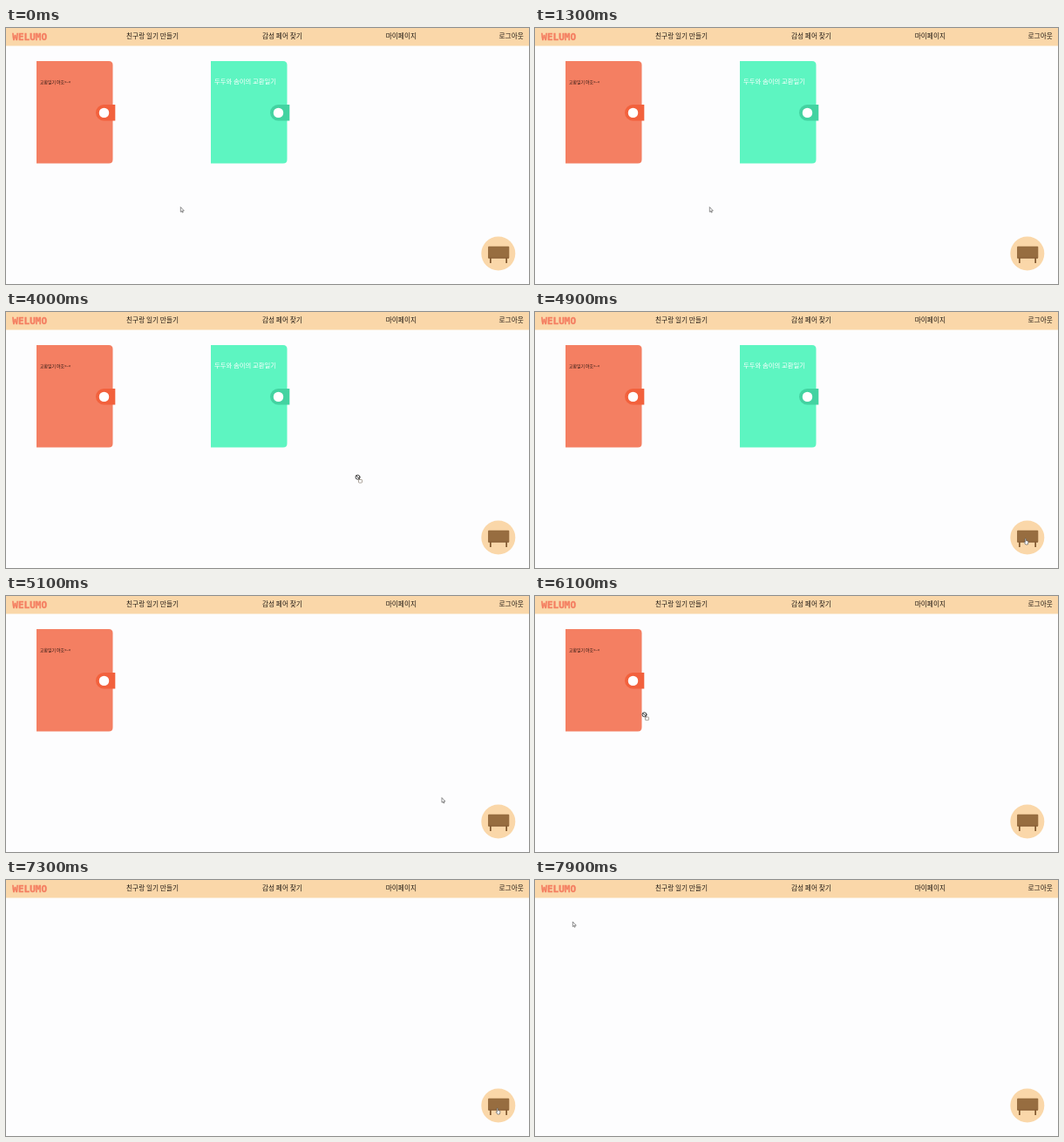
Animation of 600 by 294 pixels, one loop 8 s. Source, as an HTML page:

```html
<!DOCTYPE html>
<html>
<head>
<meta charset="utf-8">
<title>Exchange diaries</title>
<style>
  html, body { margin: 0; width: 100%; height: 100%; overflow: hidden; background: #fdfdfe; }
  svg { display: block; width: 600px; height: 294px; font-family: "Noto Sans CJK KR", "Noto Sans CJK JP", "Noto Sans CJK", sans-serif; }
  .nav { font-size: 7.7px; font-weight: 500; fill: #201a14; }
  .brand { font: 700 11px "DejaVu Sans Mono", monospace; fill: #f47f62; stroke: #f47f62; stroke-width: .4px; }
  .red { --cover: #f47f62; --clasp: #f2613d; }
  .green { --cover: #5df5c1; --clasp: #43d3a1; }
  .cover { fill: var(--cover); }
  .clasp { fill: var(--clasp); }
  .cursor { stroke-linejoin: round; stroke-linecap: round; }
</style>
</head>
<body>
<svg viewBox="0 0 600 294">
  <defs>
    <g id="book">
      <path class="cover" d="M0 0H83Q87.5 0 87.5 4.5V113Q87.5 117.5 83 117.5H0Z"/>
      <path class="clasp" d="M90.3 50V68.5H77.3A9.25 9.25 0 0 1 77.3 50Z"/>
      <circle cx="77.5" cy="59.4" r="5.7" fill="#fff"/>
    </g>
  </defs>

  <rect width="600" height="294" fill="#fdfdfe"/>
  <rect width="600" height="20.5" fill="#fad7a9"/>
  <text class="brand" x="7.3" y="13.8">WELUMO</text>
  <g class="nav">
    <text x="138" y="12">친구랑 일기 만들기</text>
    <text x="294" y="12">감성 페어 찾기</text>
    <text x="435.7" y="12">마이페이지</text>
    <text x="565.5" y="12">로그아웃</text>
  </g>

  <g id="red" class="red" transform="translate(35 38)">
    <use href="#book"/>
    <text x="4" y="25.8" font-size="4.9" font-weight="500" fill="#2a1712">교환일기 야호&gt;-&lt;</text>
  </g>
  <g id="green" class="green" transform="translate(235 38)">
    <use href="#book"/>
    <text x="4" y="26" font-size="7.36" fill="#fff">두두와 솜이의 교환일기</text>
  </g>

  <g>
    <circle cx="564.8" cy="259" r="19.5" fill="#fad7a9"/>
    <path d="M555 263h1.7v7H555zM573.3 263h1.7v7h-1.7z" fill="#80582f"/>
    <rect x="553" y="250.7" width="24.3" height="13.8" rx="1" fill="#976d40"/>
    <path d="M553.3 264H577" stroke="#80582f" stroke-width=".9"/>
  </g>

  <g id="cursor" class="cursor">
    <path id="arrow" d="M0 0V5.2L1.2 4.2L2 6L2.9 5.6L2.1 3.9H3.6Z" fill="#fff" stroke="#444" stroke-width=".6"/>
    <path id="hand" d="M1.2 .4Q1.8 -.2 2.3 .5V2.6L4.5 3.2Q5 3.4 4.9 4.2L4.3 7H1.8L.1 4.4Q.3 3.7 1.2 4.3Z" fill="#fff" stroke="#444" stroke-width=".6"/>
    <g id="no" fill="none">
      <rect x="4" y="6" width="4" height="3.6" rx=".6" stroke="#8b8073" stroke-width=".7"/>
      <circle cx="3" cy="3.2" r="2.5" fill="#ddd" fill-opacity=".45" stroke="#333" stroke-width=".9"/>
      <path d="M1.3 1.5L4.8 5" stroke="#333" stroke-width=".9"/>
    </g>
  </g>
</svg>
<script>
  const LOOP = 8000, STEP = 100;
  const GREEN_GONE = 5000, RED_GONE = 7200;

  // time, x, y, pointer shape
  const path = [
    [0, 200.3, 206, "arrow"],
    [2300, 200.3, 206, "arrow"],
    [2600, 224, 168, "arrow"],
    [2700, 236, 150, "hand"],
    [2900, 247, 127, "hand"],
    [3100, 256, 118, "hand"],
    [3600, 256, 118, "hand"],
    [3700, 272, 126, "no"],
    [4300, 529, 247, "no"],
    [4500, 556, 257, "no"],
    [4600, 561, 260, "hand"],
    [5000, 561, 260, "hand"],
    [5100, 500, 232, "arrow"],
    [5300, 258, 130, "arrow"],
    [5400, 187, 118, "arrow"],
    [5500, 112, 92, "hand"],
    [5600, 82.5, 117.5, "hand"],
    [6000, 82.5, 117.5, "hand"],
    [6100, 122.5, 133, "no"],
    [6700, 527, 246, "no"],
    [6800, 553, 254, "no"],
    [6900, 560, 260, "no"],
    [7000, 562, 262, "hand"],
    [7400, 562, 262, "hand"],
    [7500, 525, 246, "arrow"],
    [7800, 100, 70, "arrow"],
    [7900, 43.3, 48.3, "arrow"],
    [8000, 43.3, 48.3, "arrow"]
  ];

  const el = id => document.getElementById(id);
  const show = (id, on) => el(id).setAttribute("visibility", on ? "visible" : "hidden");

  function pointerAt(t) {
    const i = path.findIndex(p => p[0] > t);
    const [t0, x0, y0, shape] = path[i - 1];
    const [t1, x1, y1] = path[i];
    const k = (t - t0) / (t1 - t0);
    return { x: x0 + (x1 - x0) * k, y: y0 + (y1 - y0) * k, shape };
  }

  function draw(now) {
    const t = Math.floor((now % LOOP) / STEP) * STEP;
    const p = pointerAt(t);
    el("cursor").setAttribute("transform", `translate(${p.x} ${p.y})`);
    for (const id of ["arrow", "hand", "no"]) show(id, id === p.shape);
    show("green", t < GREEN_GONE);
    show("red", t < RED_GONE);
  }

  const start = performance.now();
  function tick() {
    draw(performance.now() - start);
    requestAnimationFrame(tick);
  }
  tick();
</script>
</body>
</html>
```
